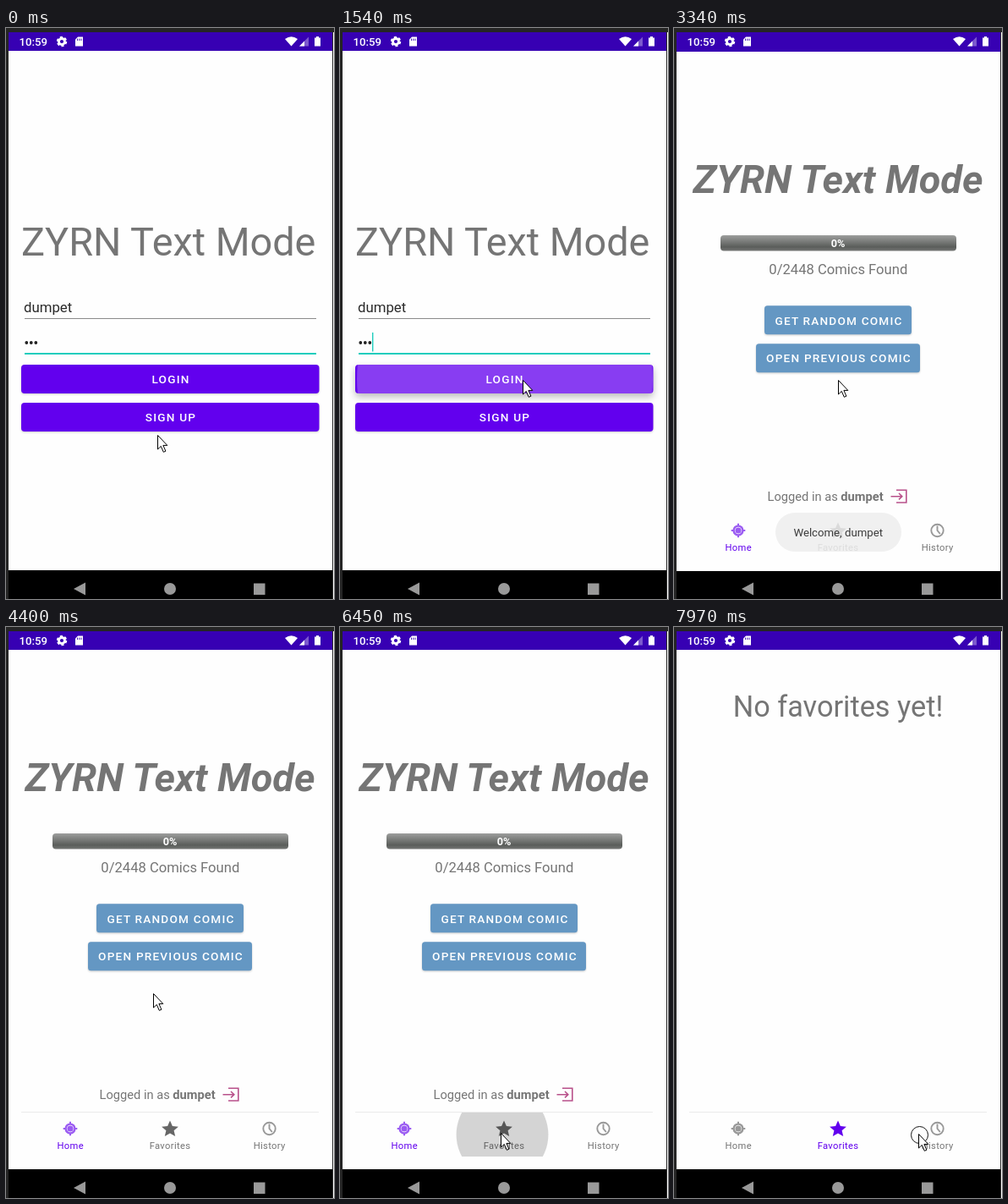
Animation, 388 px wide and 675 px high, one loop 8000 ms. Source, as an HTML page:

```html
<!DOCTYPE html>
<html lang="en">
<head>
<meta charset="utf-8">
<style>
  html, body { margin: 0; width: 100%; height: 100%; overflow: hidden; background: #222; }
  svg { display: block; width: 388px; height: 675px; font-family: Roboto, sans-serif; }
  .mid { text-anchor: middle; }
  .grey { fill: #757575; }
  .big { font-size: 46.8px; }
  .input { font-size: 16.8px; fill: #2a2a2a; }
  .cap { font-size: 13.6px; font-weight: 500; letter-spacing: 1.2px; fill: #fff; text-anchor: middle; }
  .btn { filter: drop-shadow(0 1px 1px #0003); }
  .btn.down { filter: drop-shadow(0 4px 4px #0004); }
  .tab { font-size: 11.2px; letter-spacing: .35px; }
  .tab text { text-anchor: middle; fill: #757575; }
  .tab g { color: #999; }
  .tab.star g { color: #666; }
  .tab.on text { fill: #6200ee; }
  .tab.on g { color: #9b5cf2; }
  .tab.star.on g { color: #6200ee; }
</style>
</head>
<body>
<svg viewBox="0 0 388 675">
  <defs>
    <linearGradient id="track" x2="0" y2="1">
      <stop stop-color="#9d9e9d"/><stop offset=".75" stop-color="#5a5d5a"/><stop offset="1" stop-color="#747674"/>
    </linearGradient>
    <clipPath id="loginClip"><rect x="18" y="398" width="352.5" height="34" rx="4"/></clipPath>
    <clipPath id="tabClip"><rect x="120" y="574" width="148" height="52"/></clipPath>
  </defs>

  <rect width="388" height="675" fill="#252525"/>
  <rect x="387" y="5" width="1" height="670" fill="#fff"/>
  <path d="M3 641H386V675H3Z"/>
  <g fill="#999">
    <path d="M80 663L94 655.5V670.5Z"/><circle cx="194" cy="663" r="7"/><path d="M293 656.5H306.5V670H293Z"/>
  </g>
  <path d="M3 5H386V27H3Z" fill="#3700b3"/>
  <path d="M3 27H386V641H3Z" fill="#fefefe"/>

  <g id="login">
    <text class="big grey" x="18" y="269">ZYRN Text Mode</text>
    <text class="input" x="21" y="336">dumpet</text>
    <path d="M22 343.5H367" stroke="#8a8a8a"/>
    <path d="M24.3 372h12" stroke="#222" stroke-width="3.8" stroke-linecap="round" stroke-dasharray="0 5.5"/>
    <path d="M22 385H367" stroke="#1fcdbd" stroke-width="1.8"/>
    <path id="caret" d="M38.7 360V382.5" stroke="#1fcdbd" stroke-width="1.4"/>
    <rect id="loginBtn" class="btn" x="18" y="398" width="352.5" height="34" rx="4" fill="#6200ee"/>
    <g clip-path="url(#loginClip)"><circle id="loginRipple" cx="195" cy="415" fill="#fff"/></g>
    <rect class="btn" x="18" y="443" width="352.5" height="34" rx="4" fill="#6200ee"/>
    <text class="cap" x="195" y="420">LOGIN</text>
    <text class="cap" x="195" y="465">SIGN UP</text>
    <path id="dim" d="M3 27H386V602H3Z" opacity=".015"/>
  </g>

  <g id="main">
    <path d="M3 5H386V27H3Z" fill="#3700b3"/>
    <path d="M3 27H386V641H3Z" fill="#fefefe"/>
    <g id="home">
      <text class="big grey mid" x="194" y="194" font-weight="700" font-style="italic">ZYRN Text Mode</text>
      <rect x="55" y="244" width="279" height="18.5" rx="4" fill="url(#track)"/>
      <text class="mid" x="194" y="258" font-size="12.7" font-weight="700" fill="#fff">0%</text>
      <text class="grey mid" x="194.3" y="289.5" font-size="16.6">0/2448 Comics Found</text>
      <g fill="#6497c3">
        <rect class="btn" x="107" y="327.3" width="174" height="34" rx="3.5"/>
        <rect class="btn" x="97" y="372.2" width="194" height="34" rx="3.5"/>
      </g>
      <text class="cap" x="195" y="349.6">GET RANDOM COMIC</text>
      <text class="cap" x="195" y="394.2">OPEN PREVIOUS COMIC</text>
      <text class="grey" x="110.6" y="558" font-size="14.65">Logged in as <tspan font-weight="700">dumpet</tspan></text>
      <path d="M263 545.3H274.8V560H263M256.5 552.7H269.5M266 549L269.8 552.7L266 556.4" fill="none" stroke="#b8508a" stroke-width="1.6"/>
    </g>
    <text id="favs" class="grey mid" x="194" y="106" font-size="34.3">No favorites yet!</text>
    <path id="rule" d="M18 573.5H370" stroke="#ebebeb"/>
    <g id="tabHome" class="tab">
      <g transform="translate(76 593)" fill="none" stroke="currentColor" stroke-width="2">
        <circle r="5.4" stroke-width="2.4"/><circle r="3.6" fill="currentColor" stroke="none"/>
        <path d="M0-8.3V-5M0 5V8.3M-8.3 0H-5M5 0H8.3"/>
      </g>
      <text x="76.3" y="617">Home</text>
    </g>
    <g id="tabFavs" class="tab star">
      <g transform="translate(194 593)">
        <path fill="currentColor" d="M0-9.4L2.9-2.9L9.9-2.3L4.6 2.3L6.2 9.1L0 5.5L-6.2 9.1L-4.6 2.3L-9.9-2.3L-2.9-2.9Z"/>
      </g>
      <text x="194" y="617">Favorites</text>
    </g>
    <g class="tab">
      <g transform="translate(311.5 593)" fill="none" stroke="currentColor" stroke-width="1.9">
        <circle r="7.2"/><path d="M0-5.5V0L3.3 4"/>
      </g>
      <text x="311.7" y="617">History</text>
    </g>
    <g clip-path="url(#tabClip)"><circle id="tabRipple" cx="192" cy="600"/></g>
  </g>

  <g fill="#fff">
    <text x="15.5" y="21" font-size="13.2" font-weight="500">10:59</text>
    <g transform="translate(66 16)" fill="none" stroke="#fff">
      <circle r="3.5" stroke-width="2.8"/><circle r="5.2" stroke-width="2" stroke-dasharray="3 2.445"/>
    </g>
    <path d="M85 10.5H91V21.5H82V13.5Z"/>
    <path d="M84.5 12.5V15M86.8 12.5V15M89 12.5V15" stroke="#3700b3" stroke-width=".9"/>
    <path d="M330 13Q337.5 7.5 345 13L337.5 21.5Z"/>
    <path d="M347 21.5L358 10.5V21.5Z" opacity=".35"/><path d="M347 21.5L353 15.5V21.5Z"/>
    <path d="M365 11.5H367V10H370V11.5H372V21.5H365Z"/>
  </g>

  <g id="toast">
    <rect x="120" y="573" width="149" height="46" rx="23" fill="#eee" opacity=".86"/>
    <text class="mid" x="194.2" y="601" font-size="13.2" fill="#3c3c3c">Welcome, dumpet</text>
  </g>
  <g id="cursor">
    <circle id="ring" cx="1.5" cy="1.5" r="10" fill="none" stroke="#111"/>
    <path d="M.5.5V17L4.3 13.4L7.3 20.3L9.9 19.2L6.9 12.4H11.8Z" fill="#fff" stroke="#000"/>
  </g>
</svg>
<script>
const LOOP = 8000;
const el = Object.fromEntries([...document.querySelectorAll('svg [id]')].map(e => [e.id, e]));

// Pointer key points: time, x, y
const path = [
  [0, 179, 481], [290, 232, 398], [580, 232, 398], [970, 216, 416], [3040, 216, 416],
  [3340, 194, 416], [4400, 174, 433], [4910, 129, 471], [5550, 186, 488], [5930, 190, 598],
  [6930, 190, 598], [7600, 289, 599], [LOOP, 289, 599]];

const ramp = (t, a, b) => Math.min(1, Math.max(0, (t - a) / (b - a)));
const show = (e, on) => e.setAttribute('visibility', on ? 'visible' : 'hidden');
const fade = (e, alpha) => e.setAttribute('opacity', alpha);
const move = (e, x, y) => e.setAttribute('transform', `translate(${Math.round(x)} ${Math.round(y)})`);

function pointer(t) {
  const i = path.findIndex(p => p[0] > t);
  const [a, x, y] = path[i - 1], [b, x2, y2] = path[i], k = ramp(t, a, b);
  const swing = Math.sin(Math.PI * ramp(t, 4910, 5550)); // one loop over the empty area
  return [x + (x2 - x) * k - 45 * swing, y + (y2 - y) * k - 75 * swing ** 2];
}

function ripple(e, age, radius, speed, alpha) {
  e.setAttribute('r', age < 0 ? 0 : radius + age * speed);
  fade(e, alpha);
}

function draw(t) {
  // login screen
  show(el.caret, t >= 290 && t < 700 || t >= 1260 && t < 1790);
  el.loginBtn.classList.toggle('down', t >= 1410 && t < 1790);
  ripple(el.loginRipple, t - 1410, 61, .87, .24 * (1 - ramp(t, 1540, 1790)));
  show(el.dim, t >= 3040);

  // main screen slides up into place
  el.login.style.display = t < 3460 ? '' : 'none';
  el.main.style.display = t >= 3190 ? '' : 'none';
  move(el.main, 0, 9 * (1 - ramp(t, 3190, 3460)) ** 2.5);
  show(el.rule, t >= 3460);
  fade(el.toast, ramp(t, 3010, 3190) * (1 - ramp(t, 3780, 4390)));

  // switch to the favorites tab
  const picked = t >= 6570;
  el.tabHome.classList.toggle('on', !picked);
  el.tabFavs.classList.toggle('on', picked);
  ripple(el.tabRipple, t - 6330, 26, .235, .165 * (1 - ramp(t, 6450, 6810)));
  fade(el.home, 1 - ramp(t, 6450, 6810));
  fade(el.favs, ramp(t, 6900, 7180));

  move(el.cursor, ...pointer(t));
  show(el.ring, t >= 7970);
}

const start = performance.now();
function frame() {
  draw(Math.max(0, performance.now() - start) % LOOP);
  requestAnimationFrame(frame);
}
frame();
</script>
</body>
</html>
```
